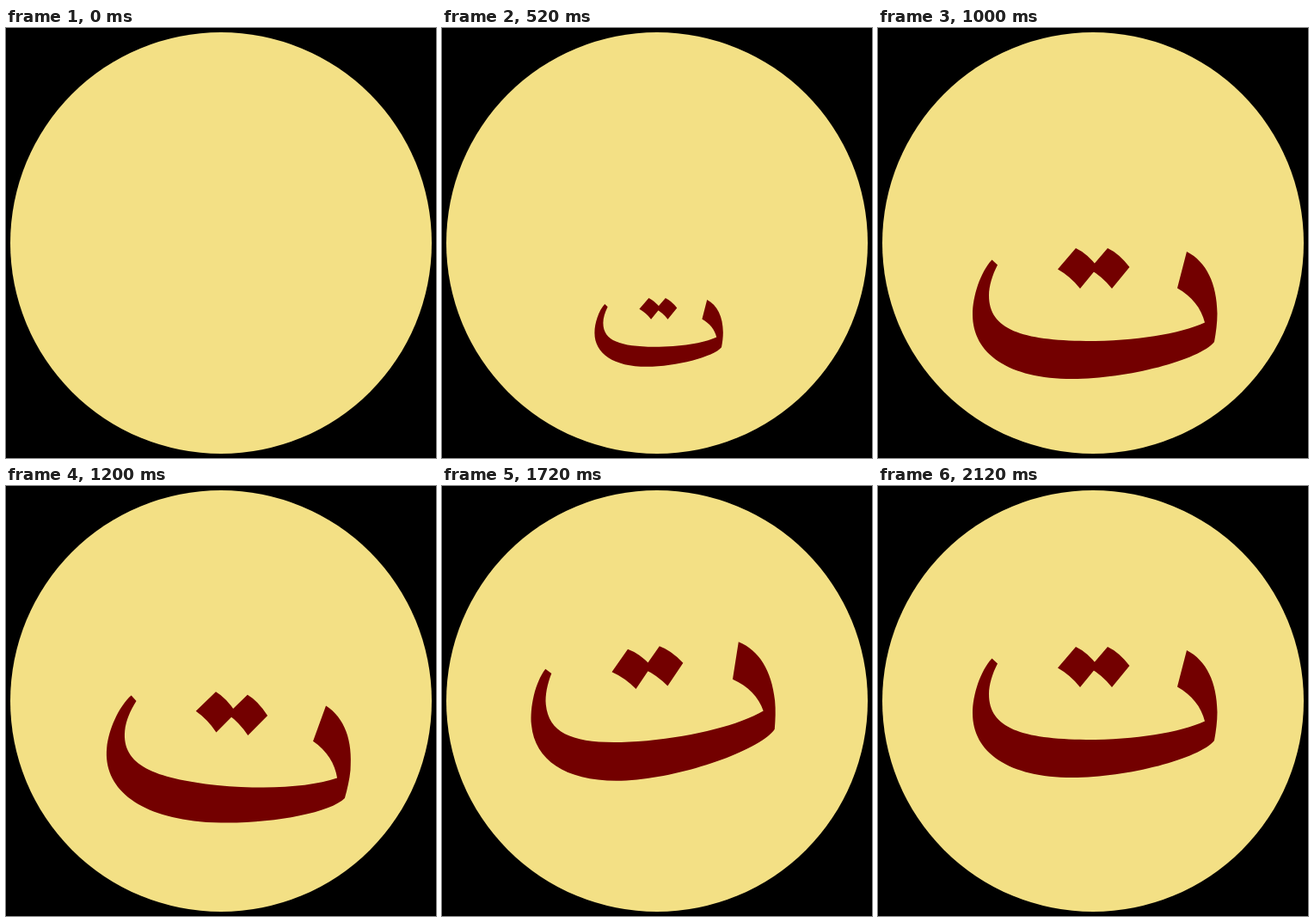
An HTML page for the animation above (2800 ms loop, 500 by 500 pixels).

```html
<!DOCTYPE html>
<html lang="ar">
<head>
<meta charset="utf-8">
<title>Bouncing letter</title>
<style>
  html, body { margin: 0; width: 100%; height: 100%; overflow: hidden; background: #000; }
  svg { display: block; width: 100%; height: 100%; }
</style>
</head>
<body>
<svg viewBox="0 0 500 500" role="img" aria-label="ت">
  <rect width="500" height="500" fill="#000"/>
  <circle cx="250" cy="250" r="245" fill="#f3e085"/>
  <g id="letter" fill="#730000">
    <path d="M132.500 200.500 C119 215 110 243 110 264 C110 310 152 339 226 339
             C290 339 374 317 391 296 C393 285 394.500 274 394.500 263
             C394 228 382 203 359 191 L348 233.500 C365 243 376 257 380 273.500
             C350 287 300 295 242 295 C168 294 129 282 129 242
             C129 231 133 218 139 206.500 Z"/>
    <path id="dot" d="M230 187 Q243 193 255.500 209 L235 234 Q224 220 209 211.500 Z"/>
    <use href="#dot" x="37"/>
  </g>
</svg>
<script>
const LOOP = 2800, STEP = 40;
const DROP = 1000, RISE = 640, SWAY = 1120;
const PIVOT = { x: 252, y: 333 };
const FLOOR = 402, FALL = 295;
const letter = document.getElementById('letter');
const clamp = v => Math.min(1, Math.max(0, v));

// One fall and one rebound to a quarter of its height.
function bounce(p) {
  return p < 0.5 ? 4 * p * p : 0.75 + 4 * (p - 0.75) ** 2;
}

function height(t) {
  if (t <= DROP) return FLOOR - FALL * (1 - bounce(t / DROP));
  const p = clamp((t - DROP) / RISE);
  return PIVOT.y + (FLOOR - PIVOT.y) * (1 + Math.cos(Math.PI * p)) / 2;
}

// Tilts right, then slightly further left.
function tilt(t) {
  const s = Math.sin(2 * Math.PI * clamp((t - DROP) / SWAY));
  return 6.6 * s - 0.6 * s * s;
}

function draw(time) {
  const t = Math.floor((time % LOOP) / STEP) * STEP;
  const scale = clamp(1.01 * t / DROP);
  letter.setAttribute('visibility', t ? 'visible' : 'hidden');
  letter.setAttribute('transform',
    `translate(${PIVOT.x} ${height(t)}) rotate(${tilt(t)}) scale(${scale}) translate(${-PIVOT.x} ${-PIVOT.y})`);
}

let start;
function tick(now) {
  start ??= now;
  draw(now - start);
  requestAnimationFrame(tick);
}
draw(0);
requestAnimationFrame(tick);
</script>
</body>
</html>
```
